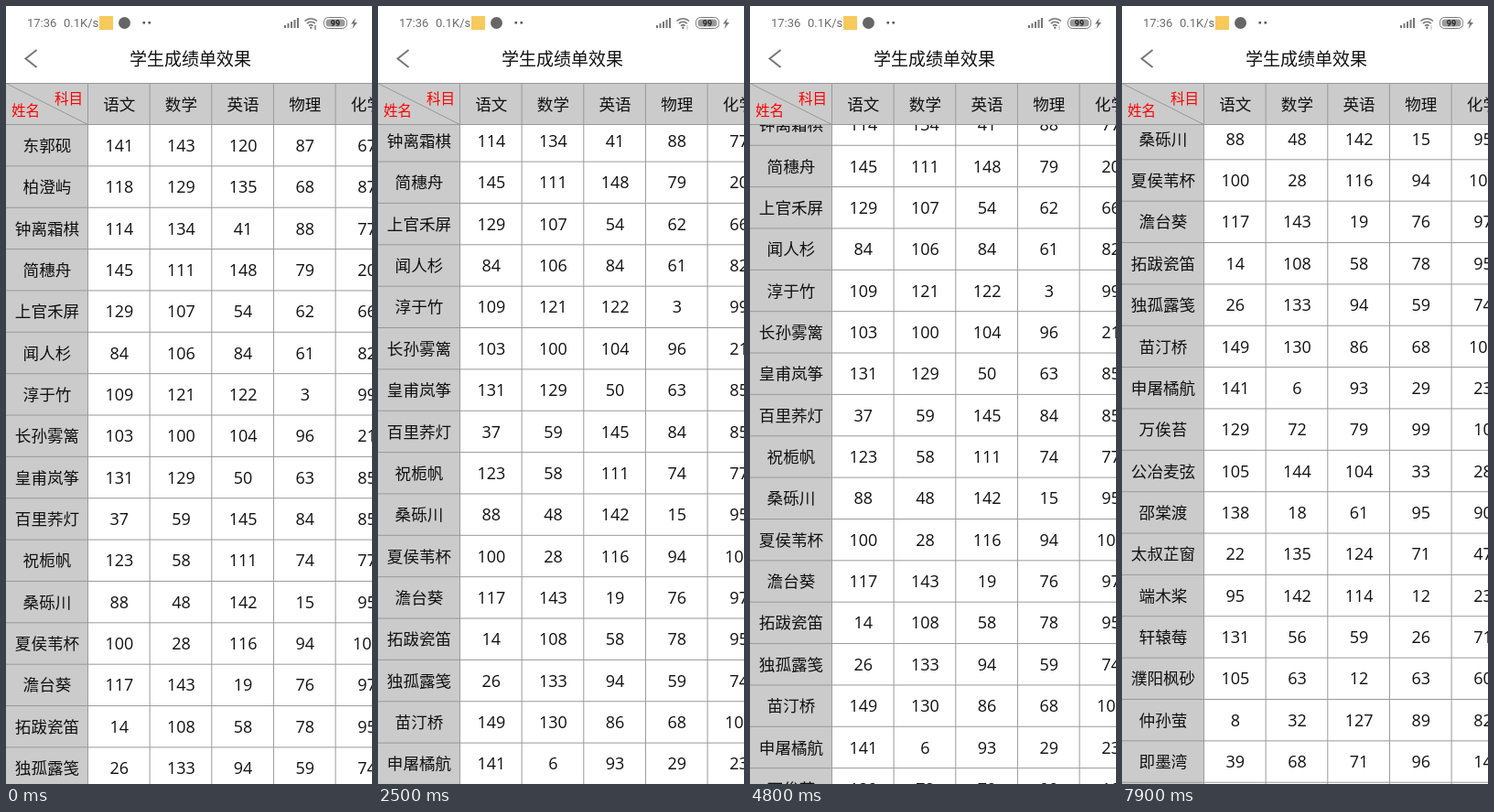
Animation of 400 by 850 pixels, one loop 8 s. Source, as an HTML page:

```html
<!DOCTYPE html>
<html lang="zh-CN">
<head>
<meta charset="utf-8">
<style>
  html, body { margin: 0; width: 100%; height: 100%; overflow: hidden; background: #fff; }
  svg { display: block; width: 100%; height: 100%; }
  text { font-family: "Noto Sans CJK SC", "Noto Sans CJK", sans-serif; font-size: 17.6px; text-anchor: middle; fill: #111; }
  .num { font-family: "Open Sans", Roboto, sans-serif; font-size: 18px; }
  .red { font-size: 15.6px; fill: #f00; }
  .status { font-family: Roboto, sans-serif; font-size: 13px; text-anchor: start; fill: #6c6c6c; }
  .line { stroke: #999; fill: none; }
  .icon { stroke: #777; fill: none; }
</style>
</head>
<body>
<svg viewBox="0 0 400 850">
  <g id="body"></g>
  <g id="names"></g>
  <g id="footer">
    <rect width="400" height="200" fill="#f3f3f3"/>
    <path class="line" d="M0 0H400"/>
    <g id="spinner" stroke="#666" stroke-width="2" stroke-linecap="round"></g>
    <text x="160" y="40.5" style="font-size:16.5px;text-anchor:start;fill:#666">正在加载<tspan letter-spacing="1.4">...</tspan></text>
  </g>
  <g id="head"></g>

  <rect y="84" width="90" height="45.5" fill="#cbcbcb"/>
  <path class="line" d="M0 84.5H400M0 129.5H89.5V84.5M0 84.5L89.5 129.5"/>
  <text class="red" x="68.5" y="107">科目</text>
  <text class="red" x="21.5" y="120">姓名</text>

  <rect width="400" height="84" fill="#fff"/>
  <text x="201.5" y="64.5" style="font-size:19px">学生成绩单效果</text>
  <path class="icon" stroke-width="2" d="M33.5 48L21.5 57.5L33.5 67"/>

  <text class="status" x="23" y="23">17:36</text>
  <text class="status" x="63" y="23">0.1K/s</text>
  <rect x="102" y="11" width="15" height="15" fill="#f8c95c"/>
  <circle cx="129.5" cy="18.5" r="6.5" fill="#666"/>
  <path fill="#555" d="M149.5 17h2.5v2.5h-2.5zM155.5 17h2.5v2.5h-2.5z"/>
  <path class="icon" stroke-width="2" d="M305 24v-3M308.5 24v-5M312 24v-7M315.5 24v-9M319 24v-11"/>
  <path class="icon" stroke-width="1.6" d="M326.5 16.5a9.5 9.5 0 0 1 13.5 0M328.8 19.2a6.3 6.3 0 0 1 9 0M331 21.8a3.3 3.3 0 0 1 4.6 0"/>
  <circle cx="333.3" cy="23.8" r="1.2" fill="#777"/>
  <path id="signal" stroke-width="1.4" d="M338 21v5"/>
  <rect class="icon" x="347.5" y="12.5" width="25" height="12" rx="5"/>
  <rect x="349.5" y="14.5" width="21" height="8" rx="3.5" fill="#999"/>
  <text x="360" y="22" style="font:bold 9px Roboto,sans-serif;fill:#222">99</text>
  <path fill="#777" d="M382 13l-5 6.5h3l-1.5 5.5l5.5-7h-3.2z"/>
</svg>
<script>
const $ = id => document.getElementById(id);
const TOP = 129.5, ROW = 45.36, LEFT = 90, COL = 67.65, PAGE = 25;

const subjects = "语文 数学 英语 物理 化学 生物 政治 历史 地理 总分".split(" ");

const students = `东郭砚 141 143 120 87 67
柏澄屿 118 129 135 68 87
钟离霜棋 114 134 41 88 77
简穗舟 145 111 148 79 20
上官禾屏 129 107 54 62 66
闻人杉 84 106 84 61 82
淳于竹 109 121 122 3 99
长孙雾篱 103 100 104 96 21
皇甫岚筝 131 129 50 63 85
百里荞灯 37 59 145 84 85
祝栀帆 123 58 111 74 77
桑砾川 88 48 142 15 95
夏侯苇杯 100 28 116 94 100
澹台葵 117 143 19 76 97
拓跋瓷笛 14 108 58 78 95
独孤露笺 26 133 94 59 74
苗汀桥 149 130 86 68 100
申屠橘航 141 6 93 29 23
万俟苔 129 72 79 99 10
公冶麦弦 105 144 104 33 28
邵棠渡 138 18 61 95 90
太叔芷窗 22 135 124 71 47
端木桨 95 142 114 12 23
轩辕莓 131 56 59 26 71
濮阳枫砂 105 63 12 63 60
仲孙萤 8 32 127 89 82
即墨湾 39 68 71 96 14`.split("\n").map(s => s.split(" "));

// 生物 政治 历史 地理 for the rows reached when scrolled sideways
const electives = `11 10 98 87
24 33 81 68
96 50 81 60
38 52 55 86
88 57 64 89
33 70 99 80
75 49 36 64
59 20 77 95
27 57 50 80
61 30 83 79
52 74 71 19
59 46 95 71
55 21 59 82
91 90 11 11
87 69 38 90
64 9 91 83`.split("\n").map(s => s.split(" "));

const label = (s, x, y, cls = "") => `<text class="${cls}" x="${x}" y="${y}">${s}</text>`;
const colX = i => LEFT + COL * i;
const rowY = i => TOP + ROW * i;

function build() {
  const rows = students.length, height = ROW * (rows + 1), width = COL * subjects.length;
  let rules = "", cells = "", names = "", head = "", dividers = "";
  for (let r = 0; r <= rows; r++) rules += `M0 ${rowY(r)}h${LEFT + width}`;
  subjects.forEach((s, c) => {
    dividers += `M${colX(c) - .5} 84V${TOP + height}`;
    head += label(s, colX(c + .5), 113.5);
  });
  students.forEach(([name, ...main], r) => {
    const y = rowY(r) + 29.3;
    names += label(name, 45, y);
    const marks = main.concat(electives[r] || []);
    if (marks.length == 9) marks.push(marks.reduce((a, b) => a + +b, 0));
    marks.forEach((m, c) => cells += label(m, colX(c + .5), y, "num"));
  });
  $("body").innerHTML = `<path class="line" d="${rules}${dividers}"/>` + cells;
  $("names").innerHTML = `<rect y="${TOP}" width="${LEFT}" height="${height}" fill="#cbcbcb"/>
    <path class="line" d="${rules.replaceAll("h" + (LEFT + width), "h" + LEFT)}M89.5 ${TOP}v${height}"/>` + names;
  $("head").innerHTML = `<rect y="84" width="${LEFT + width + 10}" height="45.5" fill="#cbcbcb"/>
    <path class="line" d="M0 ${TOP}h${LEFT + width + 10}${subjects.map((s, c) => `M${colX(c) - .5} 84V${TOP}`).join("")}"/>` + head;
  for (let i = 0; i < 12; i++)
    $("spinner").innerHTML += `<path d="M6.4 0H10.4" opacity="${Math.min(1, (i + 5) / 15)}" transform="rotate(${i * 30})"/>`;
}

// Scroll positions as [ms, px]
const scrollX = [[800, 0], [900, 100], [1000, 290], [1100, 363.5], [1500, 363.5], [1600, 185.5], [1700, 45], [1800, 0],
  [3500, 0], [3600, 100], [3700, 290], [3800, 363.5], [4100, 363.5], [4200, 185.5], [4300, 45], [4400, 0]];
const scrollY = [[2200, 0], [2300, 15], [2500, 95.5], [2700, 190], [3000, 190], [3100, 114], [3200, 0],
  [4600, 0], [4700, 30], [5000, 280], [5300, 413.5], [5500, 481], [7800, 481], [7900, 506]];

function at(keys, t) {
  const i = keys.findIndex(k => k[0] > t);
  if (i == 0) return keys[0][1];
  if (i < 0) return keys[keys.length - 1][1];
  const [t0, a] = keys[i - 1], [t1, b] = keys[i];
  return a + (b - a) * (t - t0) / (t1 - t0);
}

const move = (id, x, y) => $(id).setAttribute("transform", `translate(${x} ${y})`);

function draw(now) {
  const t = Math.floor(now % 8000 / 100) * 100;   // the picture advances ten times a second
  const x = at(scrollX, t), y = at(scrollY, t);
  move("body", -x, -y);
  move("names", 0, -y);
  move("head", -x, 0);
  move("footer", 0, rowY(PAGE) - y + (t >= 7300 ? 200 : t >= 7200 ? 34 : 0));
  const angle = Math.floor(Math.min(t, 7000) * .36 / 30) * 30;
  $("spinner").setAttribute("transform", `translate(125.5 34) rotate(${angle})`);
  $("signal").setAttribute("stroke", t < 400 ? "#777" : "#ccc");
  requestAnimationFrame(draw);
}

build();
requestAnimationFrame(draw);
</script>
</body>
</html>
```
